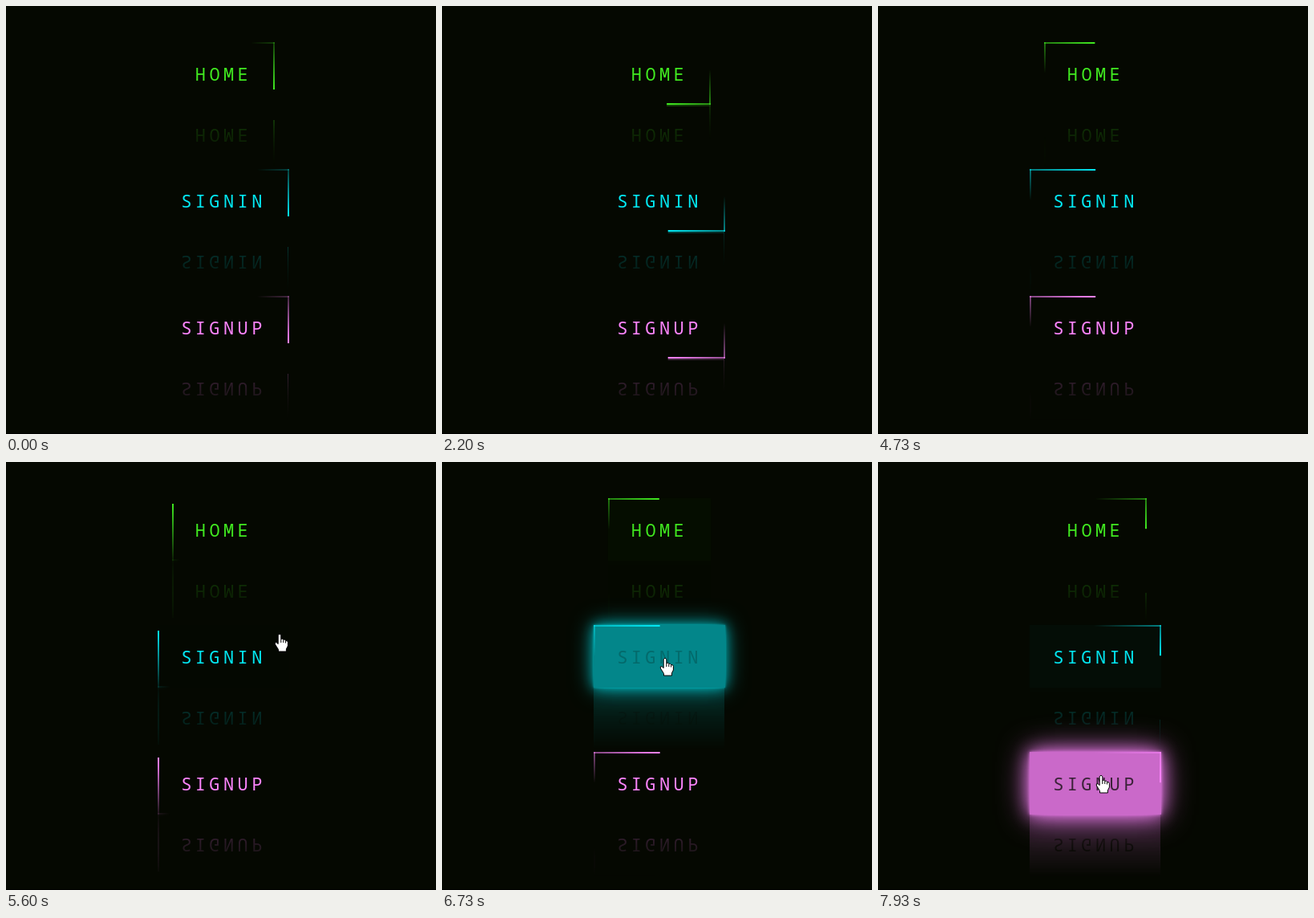
Animation, 536 px wide and 533 px high, one loop 8 s. Source, as an HTML page:

```html
<!DOCTYPE html>
<html lang="en">
<head>
<meta charset="utf-8">
<title>Neon buttons</title>
<style>
  html, body { margin: 0; width: 100%; height: 100%; overflow: hidden; background: #050801; }
  #stage { position: relative; width: 536px; height: 533px; overflow: hidden; }
  #stage::after { content: ""; position: absolute; inset: auto 0 0; height: 1px; background: #000; }

  .button {
    --p: 0;
    --glow: color-mix(in srgb, var(--c) calc(var(--p) * 100%), transparent);
    position: absolute;
    left: calc(271px - var(--w) / 2);
    width: var(--w);
    height: 78px;
    overflow: hidden;
    text-align: center;
    font: 500 22px/78px "Noto Sans Mono", monospace;
    letter-spacing: 4.4px;
    color: color-mix(in srgb, #050801 calc(var(--p) * 100%), var(--c));
    background: var(--glow);
    box-shadow: 0 0 calc(5px * var(--p)) var(--glow),
                0 0 calc(25px * var(--p)) var(--glow),
                0 0 calc(50px * var(--p)) var(--glow);
    -webkit-box-reflect: below 0px linear-gradient(transparent, #0004);
  }
  .home   { --c: #41eb20; --w: 128.8px; top: 45px; }
  .signin { --c: #03e9f4; --w: 163.2px; top: 203px; }
  .signup { --c: #ff85ff; --w: 163.2px; top: 361px; }

  .button i { position: absolute; background: linear-gradient(var(--angle), transparent, var(--c)); }
  .button i:nth-of-type(odd) { width: 100%; height: 2px; left: 0; }
  .button i:nth-of-type(even) { width: 2px; height: 100%; top: 0; }
  .button i:nth-of-type(1) { --angle: 90deg; top: 0; }
  .button i:nth-of-type(2) { --angle: 180deg; right: 0; }
  .button i:nth-of-type(3) { --angle: 270deg; bottom: 0; }
  .button i:nth-of-type(4) { --angle: 360deg; left: 0; }

  #cursor { position: absolute; left: 0; top: 0; overflow: visible; fill: #fff; stroke: #000; stroke-linejoin: round; }
</style>
</head>
<body>
<div id="stage">
  <div class="button home">HOME<i></i><i></i><i></i><i></i></div>
  <div class="button signin">SIGNIN<i></i><i></i><i></i><i></i></div>
  <div class="button signup">SIGNUP<i></i><i></i><i></i><i></i></div>
  <svg id="cursor" width="20" height="24">
    <g id="hand">
      <path d="M-1.8 1.5Q0-1 1.8 1.5V6.5Q3.5 5.5 4.8 7.2Q6.5 6.6 7.6 8.4Q10 8 10.4 10.5V15L8.4 19V22H-1.5V19.5L-5.6 13Q-6.5 10-4 10.6L-1.8 12.6Z"/>
      <path d="M1.8 6.5V11M4.8 7.5V11M7.6 8.5V11.5" fill="none"/>
    </g>
    <path id="arrow" d="M0 0V16.5L3.8 13L6.4 19L9 18L6.4 12H11.5Z"/>
  </svg>
</div>
<script>
const LOOP = 8000, FPS = 15, FADE = 500;
const $ = selector => document.querySelector(selector);

// [ms, turns of the border light]; it holds still once near the start
const clock = [[0, .439], [333, .772], [400, .772], [1200, 1.608], [2200, 2.608], [3867, 4.272],
  [5600, 5.9775], [6733, 7.125], [7933, 8.372], [8000, 8.439]];

// [ms, x, y] of the pointer tip
const path = [[0, 560, 560], [5200, 560, 560], [5600, 341, 214], [5680, 328, 202], [5800, 305, 122],
  [5950, 288, 92], [6230, 281, 95], [6330, 280, 124], [6570, 278, 204], [6733, 278, 244],
  [7380, 278, 250], [7530, 278, 282], [7690, 278, 361], [7800, 278, 383], [7933, 278, 390], [8000, 278, 391]];

const directions = [[1, 0], [0, 1], [-1, 0], [0, -1]];

const buttons = [
  { el: $('.home'), hovers: [[5800, 6330]] },
  { el: $('.signin'), hovers: [[5595, 5680], [6570, 7530]] },
  { el: $('.signup'), hovers: [[7690, LOOP]] },
];

function along(points, t) {
  const i = Math.max(1, points.findIndex(p => p[0] >= t));
  const [a, b] = [points[i - 1], points[i]];
  const k = (t - a[0]) / (b[0] - a[0]);
  return a.slice(1).map((v, j) => v + (b[j + 1] - v) * k);
}

// CSS "ease": cubic-bezier(.25, .1, .25, 1)
function ease(x) {
  if (x <= 0) return 0;
  if (x >= 1) return 1;
  let low = 0, high = 1, s;
  for (let n = 0; n < 20; n++) {
    s = (low + high) / 2;
    if (.75 * s * (1 - s) + s ** 3 < x) low = s; else high = s;
  }
  return .3 * s * (1 - s) ** 2 + 3 * s * s * (1 - s) + s ** 3;
}

const hoverLevel = (hovers, t) => Math.max(...hovers.map(([enter, leave]) =>
  ease((Math.min(t, leave) - enter) / FADE) * (1 - ease((t - leave) / FADE))));

function draw(t) {
  const [turn] = along(clock, t);
  let overButton = false;

  for (const { el, hovers } of buttons) {
    el.style.setProperty('--p', hoverLevel(hovers, t).toFixed(4));
    overButton ||= hovers.some(([enter, leave]) => t >= enter && t < leave);
    el.querySelectorAll('i').forEach((edge, k) => {
      const phase = (turn - k / 4 + 1) % 1;
      const shift = (Math.min(4 * phase, 2) - 1) * 100;
      const [dx, dy] = directions[k];
      edge.style.transform = `translate(${dx * shift}%, ${dy * shift}%)`;
    });
  }

  const [x, y] = along(path, t);
  $('#cursor').style.transform = `translate(${x}px, ${y}px)`;
  $('#hand').style.display = overButton ? '' : 'none';
  $('#arrow').style.display = overButton ? 'none' : '';
}

function tick() {
  const t = performance.now() % LOOP;
  draw(Math.floor((t + 3.4) * FPS / 1000) * 1000 / FPS % LOOP);
  requestAnimationFrame(tick);
}
tick();
</script>
</body>
</html>
```
